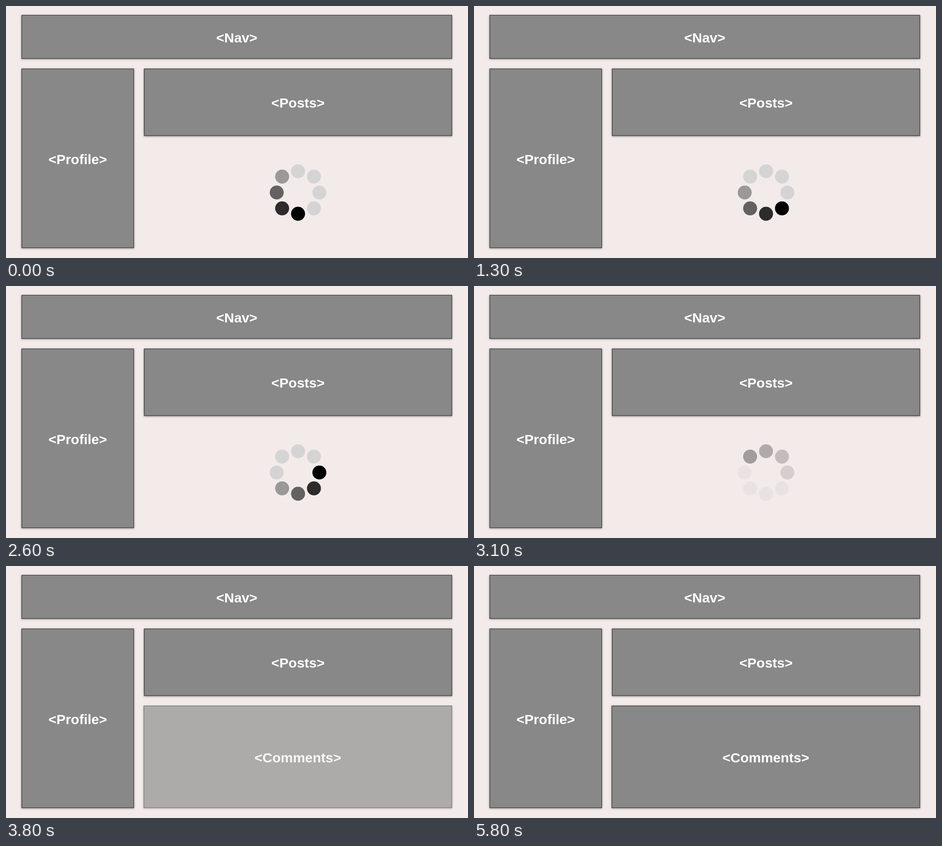
An HTML page for the animation above (5900 ms loop, 1012 by 553 pixels).

```html
<!DOCTYPE html>
<html lang="en">
<head>
<meta charset="utf-8">
<title>Layout loading</title>
<style>
  html, body { margin: 0; width: 100%; height: 100%; overflow: hidden; background: #f3eaea; }
  svg { display: block; width: 1012px; height: 553px; }
  rect { fill: #888; stroke: #3c3a3a; stroke-width: 1.3; filter: drop-shadow(0 1.5px 2px rgba(0, 0, 0, .4)); }
  text { fill: #fff; font: bold 30px "Liberation Sans", Arial, sans-serif; text-anchor: middle; }
</style>
</head>
<body>
<svg id="stage" viewBox="0 0 1012 553"></svg>
<script>
const LOOP = 5900, TICK = 100;
const STEP = 145.45, STEP_OFFSET = 86;
const SHADES = ['#000', '#2d2b2b', '#636161', '#9b9898'];
const IDLE = '#d5d4d4';

const stage = document.getElementById('stage');

function add(parent, tag, attrs = {}, text = '') {
  const el = document.createElementNS('http://www.w3.org/2000/svg', tag);
  for (const name in attrs) el.setAttribute(name, attrs[name]);
  el.textContent = text;
  return parent.appendChild(el);
}

function panel(label, left, top, right, bottom, baseline) {
  const group = add(stage, 'g');
  add(group, 'rect', { x: left, y: top, width: right - left, height: bottom - top });
  add(group, 'text', { x: (left + right) / 2, y: baseline }, label);
  return group;
}

panel('<Nav>', 34.5, 20.3, 976.5, 115.2, 80);
panel('<Profile>', 34.5, 138, 279.7, 530.5, 346.5);
panel('<Posts>', 302.8, 138, 976.5, 284.5, 223);
const comments = panel('<Comments>', 302, 307, 976.5, 530.5, 431);

// Dots run clockwise from the top; the diagonal ones sit slightly further out.
const spinner = add(stage, 'g');
const dots = Array.from({ length: 8 }, (_, i) => {
  const angle = i * Math.PI / 4, radius = i % 2 ? 49.3 : 46.7;
  return add(spinner, 'circle', {
    cx: 639.7 + radius * Math.sin(angle),
    cy: 409.2 - radius * Math.cos(angle),
    r: 15.3
  });
});

function smooth(from, to, t) {
  const p = Math.min(1, Math.max(0, (t - from) / (to - from)));
  return p * p * (3 - 2 * p);
}

function draw(t) {
  const steps = Math.floor((t + STEP_OFFSET) / STEP);
  const head = 44 - steps;
  dots.forEach((dot, i) => {
    dot.setAttribute('fill', SHADES[(i - head + 80) % 8] || IDLE);
  });
  spinner.setAttribute('opacity', 1 - smooth(2650, 3380, t));
  comments.setAttribute('opacity', smooth(3500, 4000, t));
}

const start = performance.now();
function frame() {
  const t = (performance.now() - start) % LOOP;
  draw(Math.floor(t / TICK) * TICK);
  requestAnimationFrame(frame);
}
frame();
</script>
</body>
</html>
```
